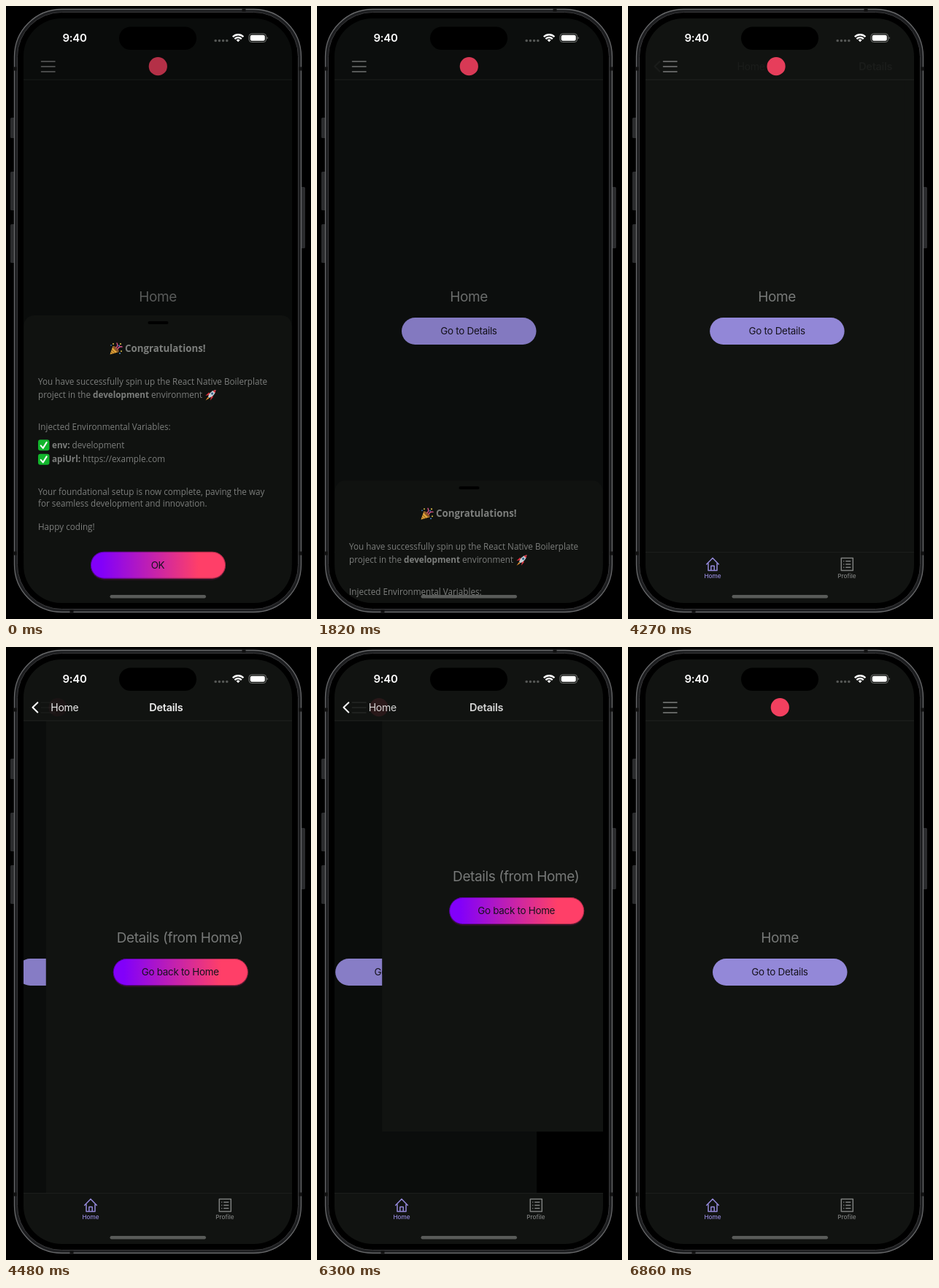
An HTML page that plays this animation: 418 by 840 pixels, repeating every 8000 ms.

```html
<!DOCTYPE html>
<html lang="en">
<head>
<meta charset="utf-8">
<title>Phone app demo</title>
<style>
  html, body { margin: 0; width: 100%; height: 100%; overflow: hidden; background: #000; }
  svg { display: block; width: 100%; height: 100%; }
  text { font-family: Inter, "Liberation Sans", sans-serif; letter-spacing: -.02em; white-space: pre; }
  .mid { text-anchor: middle; }
  .title { font-size: 19px; fill: #777978; }
  .btn { font-size: 13.4px; fill: #15121c; }
  .nav { font-size: 14px; fill: #fff; }
  .bold { font-weight: 600; }
  .tab { font-size: 8.2px; font-weight: 500; letter-spacing: 0; }
  .line { fill: none; stroke-linecap: round; stroke-linejoin: round; }
  #sheet .copy { font: 11.7px "Open Sans", "Noto Sans", sans-serif; letter-spacing: 0; fill: #7c7e7c; }
  #sheet .copy.head { font-size: 13.3px; font-weight: 700; }
  #sheet tspan { font-weight: 700; }
</style>
</head>
<body>
<svg viewBox="0 0 418 840">
  <defs>
    <linearGradient id="grad">
      <stop offset=".08" stop-color="#8200fa"/>
      <stop offset=".8" stop-color="#ff3f68"/>
    </linearGradient>
    <clipPath id="screen"><rect x="24" y="17" width="368" height="801" rx="52"/></clipPath>
    <clipPath id="content"><rect x="24" y="101" width="368" height="647"/></clipPath>
    <g id="pill">
      <rect x="116" y="428" width="185" height="38" rx="19" fill="#4d1238" opacity=".5"/>
      <rect x="116" y="427" width="185" height="37" rx="18.5" fill="url(#grad)"/>
      <rect x="116.5" y="427.5" width="184" height="36" rx="18" fill="none" stroke="#000" stroke-opacity=".35"/>
    </g>
    <g id="check">
      <rect x="44" y="0" width="15.5" height="15" rx="3" fill="#12b52c"/>
      <path class="line" d="M47.7 8l3 3.6 5-8" stroke="#fff" stroke-width="2"/>
    </g>
  </defs>

  <!-- phone body -->
  <g fill="#2b2c2e">
    <rect x="6" y="153" width="7" height="28" rx="1.5"/>
    <rect x="6" y="227" width="7" height="53" rx="1.5"/>
    <rect x="6" y="299" width="7" height="53" rx="1.5"/>
    <rect x="403" y="248" width="7" height="84" rx="1.5"/>
  </g>
  <rect x="11.5" y="4.5" width="393" height="826" rx="65" fill="#1d1e20" stroke="#68696b" stroke-width="1.3"/>
  <rect x="15.5" y="8.5" width="385" height="818" rx="61" fill="#000" stroke="#39393b"/>
  <path d="M11 86h4M401 86h4M11 750h4M401 750h4M326 4v4M90 827v4" stroke="#111" stroke-width="5"/>

  <g clip-path="url(#screen)">
    <rect id="bg" x="24" y="17" width="368" height="801"/>
    <g clip-path="url(#content)">
      <rect x="24" y="101" width="368" height="647" fill="#000"/>
      <g id="home">
        <rect id="homeBg" x="24" y="101" width="368" height="647"/>
        <text class="title mid" x="208" y="405">Home</text>
        <rect x="116" y="427" width="184.5" height="37" rx="18.5" fill="#9388d8"/>
        <text class="btn mid" x="208" y="450.3">Go to Details</text>
        <rect id="homeDim" x="24" y="101" width="368" height="647"/>
      </g>
      <g id="detail">
        <rect x="24" y="101" width="368" height="647" fill="#111311"/>
        <text class="title mid" x="207.5" y="405">Details (from Home)</text>
        <use href="#pill"/>
        <text class="btn mid" x="208" y="450.3">Go back to Home</text>
      </g>
    </g>

    <!-- header -->
    <path d="M24 101h368" stroke="#202220"/>
    <path id="menu" class="line" d="M48.5 76h18.5M48.5 83h18.5M48.5 90h18.5" stroke="#7d7f7e" stroke-width="1.6"/>
    <circle id="logo" cx="208.3" cy="82.7" r="12.6" fill="#f2405f"/>
    <path id="chevron" class="line" d="M43.3 76.2l-6.8 6.6 6.8 6.6" stroke="#fff" stroke-width="2.1"/>
    <text id="back" class="nav" x="53" y="88">Home</text>
    <text id="heading" class="nav bold mid" x="208" y="88" style="font-size:14.5px">Details</text>

    <!-- tab bar -->
    <path d="M24 748.5h368" stroke="#1c1e1c"/>
    <g class="line" stroke-width="1.5">
      <path stroke="#9388d8" d="M107.7 765l8.3-8.6 8.3 8.6M110 763.5v10h12v-10M113.8 773v-5.8h4.4v5.8"/>
      <path stroke="#7d7f7e" d="M292.3 756.5h16v17h-16zM298.8 760.8h6M298.8 765h6M298.8 769.2h6M295.7 760.8h.1M295.7 765h.1M295.7 769.2h.1"/>
    </g>
    <text class="tab mid" x="116" y="784.3" fill="#9388d8">Home</text>
    <text class="tab mid" x="300" y="784.3" fill="#7d7f7e">Profile</text>

    <rect id="dim" x="24" y="17" width="368" height="801"/>

    <!-- bottom sheet -->
    <g id="sheet">
      <rect x="24.5" y="424" width="367" height="420" rx="14" fill="#101210"/>
      <rect x="194.5" y="432" width="28" height="4" rx="2" fill="#000"/>
      <g transform="translate(142 461)">
        <path d="M.5 16.5L4.5 5l8 8z" fill="#e5a93a"/>
        <path d="M3 10l4.5 4.8M2 13l2.5 2.6" stroke="#9a6422" stroke-width="1.2"/>
        <ellipse cx="8.5" cy="9" rx="2" ry="5.4" transform="rotate(-45 8.5 9)" fill="#8a5426"/>
        <path class="line" d="M9 7q3-2 1-6M11 9q2-4 6-3" stroke="#d9548a" stroke-width="1.4"/>
        <g fill="#d7bd4a"><circle cx="5" cy="2" r="1"/><circle cx="15" cy="2" r="1.1"/><circle cx="16" cy="12" r="1"/></g>
        <g fill="#4c9be0"><circle cx="13" cy="4.5" r=".9"/><circle cx="14" cy="15" r=".9"/><circle cx="2" cy="4" r=".8"/></g>
      </g>
      <text class="copy head" x="163" y="473.7">Congratulations!</text>
      <text class="copy" x="44" y="519">You have successfully spin up the React Native Boilerplate</text>
      <text class="copy" x="44" y="537">project in the <tspan>development</tspan> environment</text>
      <g transform="translate(273 525.5)">
        <path d="M.3 8.5l5-4.500 2.500 3zM7 15l4-5-2.500-2.500z" fill="#d8303c"/>
        <path d="M4 10Q6 2 14.5.5 13.5 9 5.5 11.5z" fill="#c9ced4"/>
        <path d="M10.500 1.800Q13 .7 14.5.5 14.3 2.5 13.3 4.700z" fill="#d8303c"/>
        <circle cx="9.6" cy="5.6" r="1.6" fill="#35658c"/>
        <path d="M4 10.2L.5 15l4.800-3z" fill="#f09a32"/>
      </g>
      <text class="copy" x="44" y="581">Injected Environmental Variables:</text>
      <use href="#check" y="594.3"/>
      <text class="copy" x="63" y="606"><tspan>env:</tspan> development</text>
      <use href="#check" y="613.8"/>
      <text class="copy" x="63" y="625"><tspan>apiUrl:</tspan> https://example.com</text>
      <text class="copy" x="44" y="669.5">Your foundational setup is now complete, paving the way</text>
      <text class="copy" x="44" y="685.7">for seamless development and innovation.</text>
      <text class="copy" x="44" y="717.5">Happy coding!</text>
      <use href="#pill" y="320.7"/>
      <text class="btn mid" x="208" y="771">OK</text>
    </g>
    <rect x="142.5" y="807" width="131.5" height="4.4" rx="2.2" fill="#595b59"/>
  </g>

  <!-- status bar -->
  <rect x="155" y="28.5" width="106" height="31.5" rx="15.75" fill="#000"/>
  <text class="bold" x="77.5" y="49" font-size="15" fill="#fff">9:40</text>
  <path class="line" d="M287.2 47.5h16" stroke="#555755" stroke-width="3.6" stroke-dasharray="0 5.2"/>
  <path d="M310.8 42.3a10.3 10.3 0 0 1 14.6 0M313.4 45.1a6.6 6.6 0 0 1 9.4 0" fill="none" stroke="#fff" stroke-width="2.3"/>
  <path d="M318.1 49.3l-2.5-2.6a3.6 3.6 0 0 1 5 0z" fill="#fff"/>
  <rect x="333" y="38" width="23.5" height="11.5" rx="3.6" fill="none" stroke="#737573"/>
  <rect x="334.7" y="39.7" width="20.1" height="8.1" rx="2.2" fill="#fff"/>
  <path d="M357.7 42v3.6q1.3-.5 1.3-1.8t-1.3-1.8z" fill="#737573"/>
</svg>
<script>
const LOOP = 8000, STEP = 70;
const WIDTH = 368, SHEET = 394;
const BG = '#111311';
const $ = id => document.getElementById(id);
const set = (id, attrs) => {
  for (const key in attrs) $(id).setAttribute(key, attrs[key]);
};
const move = (x, y = 0) => `translate(${x.toFixed(2)} ${y.toFixed(2)})`;

// Critically damped spring; lead is the time already spent at the first visible step.
function spring(t, start, lead, length) {
  if (t < start) return 0;
  if (t >= start + length) return 1;
  const a = 18.2 * (t - start + lead) / 1000;
  return 1 - (1 + a) * Math.exp(-a);
}

function draw(t) {
  const closed = spring(t, 1820, 106, 350);
  const popped = spring(t, 6300, 41.8, 560);
  const p = spring(t, 4270, 16, 560) - popped;
  const rest = 1 - p;

  const shade = closed < 1 ? '#0d100f' : BG;
  set('bg', { fill: shade });
  set('dim', { opacity: 0.26 * (1 - closed) });
  set('sheet', { transform: move(0, SHEET * closed), visibility: closed < 1 ? 'visible' : 'hidden' });

  set('homeBg', { fill: p > 0.05 ? '#0c0e0d' : shade });
  set('homeDim', { opacity: 0.1 * p });
  set('home', { transform: move(-0.3 * WIDTH * p) });
  set('detail', {
    transform: move(WIDTH * rest, popped > 0 ? -84 : 0),
    visibility: p > 0 ? 'visible' : 'hidden'
  });

  set('menu', { opacity: rest });
  set('logo', { opacity: rest ** 1.3, transform: move(-150 * p) });
  set('chevron', { opacity: Math.min(1, p * 1.15) });
  set('back', { opacity: p, transform: move(100 * rest) });
  set('heading', { opacity: p, transform: move(136 * rest) });
}

const begin = performance.now();
function tick() {
  const t = (performance.now() - begin) % LOOP;
  draw(Math.floor(t / STEP) * STEP);
  requestAnimationFrame(tick);
}
tick();
</script>
</body>
</html>
```
